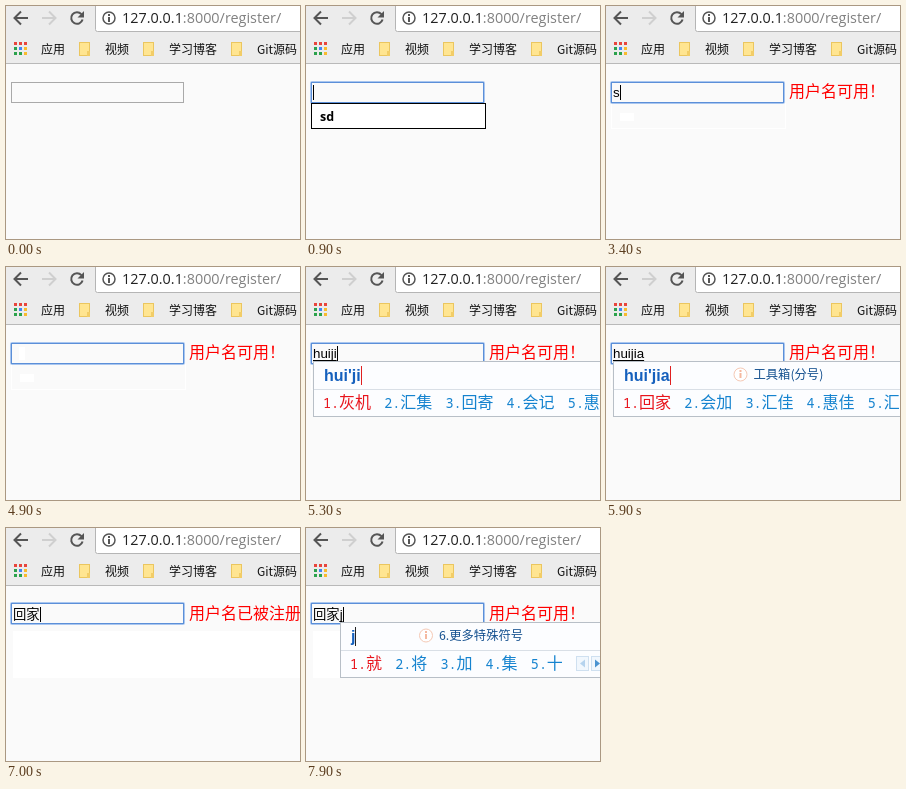
An HTML page for the animation above (8000 ms loop, 294 by 233 pixels).

```html
<!DOCTYPE html>
<html lang="zh">
<head>
<meta charset="utf-8">
<style>
html, body { margin: 0; width: 100%; height: 100%; overflow: hidden; background: #fafafa; }
svg { display: block; width: 294px; height: 233px; }
text { font-family: "Noto Sans CJK SC", "Noto Sans CJK", sans-serif; white-space: pre; }
.url { font: 14.4px "Open Sans", sans-serif; }
.mark { font-size: 12px; fill: #111; }
.field { font: 13.333px "Liberation Sans", "Noto Sans CJK SC", sans-serif; }
.pinyin { font: bold 16px "Liberation Sans", sans-serif; fill: #1560bd; }
.num { font: 13.5px "Noto Sans Mono", monospace; }
.word { font-size: 16px; }
.message { font: 16px "Noto Sans CJK TC", "Noto Sans CJK SC", sans-serif; }
.hint { font-size: 12.3px; fill: #14508f; }
.saved { font: bold 12.5px "Open Sans", sans-serif; }
</style>
</head>
<body>
<svg id="stage" viewBox="0 0 294 233"></svg>
<script>
const stage = document.getElementById('stage');

function add(parent, tag, attrs, text) {
  const node = document.createElementNS('http://www.w3.org/2000/svg', tag);
  for (const key in attrs) node.setAttribute(key, attrs[key]);
  if (text !== undefined) node.textContent = text;
  return parent.appendChild(node);
}
const box = (parent, x, y, width, height, fill, more) =>
  add(parent, 'rect', { x, y, width, height, fill, ...more });
const label = (parent, x, y, cls, text, fill) =>
  add(parent, 'text', fill ? { x, y, class: cls, fill } : { x, y, class: cls }, text);
const line = (parent, d, stroke, width) =>
  add(parent, 'path', { d, stroke, 'stroke-width': width, fill: 'none' });
const group = (parent = stage) => add(parent, 'g', {});
const show = (node, on) => node.setAttribute('display', on ? 'inline' : 'none');

function drawBrowser() {
  const g = group();
  box(g, 0, 0, 294, 233, '#fafafa');
  box(g, 0, 0, 294, 57, '#ececec');
  box(g, 0, 57, 294, 1, '#b9b9b9');
  box(g, 89.5, -5.5, 220, 31, '#fff', { stroke: '#b5b5b5', rx: 2 });

  line(g, 'M22 12H9M15 5.5L8.5 12L15 18.5', '#555', 2);
  line(g, 'M36 12H49M43 5.5L49.5 12L43 18.5', '#cfcfcf', 2);
  line(g, 'M75.4 8.2A5.8 5.8 0 1 0 76.6 13.6', '#555', 2);
  add(g, 'path', { d: 'M78 5V11.5H71.5Z', fill: '#555' });
  add(g, 'circle', { cx: 103, cy: 12, r: 6, fill: 'none', stroke: '#555', 'stroke-width': 1.5 });
  box(g, 102, 11, 2, 5, '#555');
  box(g, 102, 8, 2, 2, '#555');

  const url = label(g, 116, 17, 'url', '', '#222');
  add(url, 'tspan', {}, '127.0.0.1');
  add(url, 'tspan', { fill: '#808080' }, ':8000/register/');

  const red = '#e8453c', green = '#2ba24c', blue = '#4285f4', yellow = '#f9bb2d';
  [red, red, red, green, blue, yellow, green, green, yellow].forEach((c, i) =>
    box(g, 8 + i % 3 * 5, 36 + Math.floor(i / 3) * 5, 3, 3, c));

  label(g, 35, 48, 'mark', '应用');
  [[73, '视频'], [137, '学习博客'], [225, 'Git源码']].forEach(([x, name]) => {
    box(g, x + .5, 36.5, 10, 13, '#ffe591', { stroke: '#ebc65f' });
    box(g, x + 8, 45, 3, 5, '#f2cd68');
    label(g, x + 26, 48, 'mark', name);
  });
}
drawBrowser();

// Pale traces left behind by closed menus
const menuTrace = group();
box(menuTrace, 5.5, 97.5, 174, 25, 'none', { stroke: '#fff' });
box(menuTrace, 14, 107, 14, 8, '#fff');
const panelTrace = box(stage, 7, 103, 287, 47, '#fff');

const plainField = box(stage, 5.5, 76.5, 172, 20, '#fafafa', { stroke: '#a9a9a9' });
const focusField = group();
box(focusField, 4.5, 75.5, 174, 22, 'none', { stroke: '#a9c6ef', rx: 1 });
box(focusField, 5.5, 76.5, 172, 20, '#fafafa', { stroke: '#5b8fd8' });
const fieldTrace = box(stage, 13, 80, 6, 13, '#fff');
const typed = label(stage, 7, 91, 'field', '', '#000');
const underline = box(stage, 7, 93, 0, 1, '#000');
const caret = box(stage, 7, 79, 1, 15, '#000');
const message = label(stage, 183, 91, 'message', '', '#f00');

const menu = group();
box(menu, 5.5, 97.5, 174, 25, '#fff', { stroke: '#000' });
label(menu, 14, 115, 'saved', 'sd');

const panel = group();

function drawPanel({ left, code, words, hint, hintX, pager }) {
  panel.replaceChildren();
  box(panel, left + .5, 94.5, 300, 55, '#fcfdff', { stroke: '#b8bfc7' });
  box(panel, left + 1, 122, 300, 1, '#d9dfe6');
  const pinyin = label(panel, left + 11, 114, 'pinyin', code);
  const end = left + 11 + pinyin.getComputedTextLength();
  box(panel, Math.round(end), 99, 1, 19, code === 'j' ? '#222' : '#e02020');

  if (hint) {
    add(panel, 'circle', { cx: hintX, cy: 107.5, r: 6.5, fill: '#fff', stroke: '#f5c9b5' });
    box(panel, hintX - 1, 106, 2, 5, '#f5b9a0');
    box(panel, hintX - 1, 103, 2, 2, '#f5b9a0');
    label(panel, hintX + 13, 112, 'hint', hint);
  }

  const pitch = words[0].length * 16 + 29.2;
  [...words].forEach((word, i) => {
    const x = left + 10 + i * pitch;
    const fill = i ? '#1583cf' : '#e8141c';
    label(panel, x, 141, 'num', i + 1 + '.', fill);
    label(panel, x + 16, 141, 'word', word, fill);
  });

  if (pager) {
    box(panel, 270.5, 128.5, 12, 14, '#f1f7fd', { stroke: '#cfe0f0' });
    box(panel, 285.5, 128.5, 12, 14, '#f1f7fd', { stroke: '#cfe0f0' });
    add(panel, 'path', { d: 'M279 131.5V139.5L274 135.5Z', fill: '#b5d3ee' });
    add(panel, 'path', { d: 'M289 131.5V139.5L294 135.5Z', fill: '#4b93d0' });
  }
}

const free = '用户名可用！', taken = '用户名已被注册！';
const hu = { left: 7, code: 'hu', words: '湖户胡护虎', pager: true };
const hui = { left: 7, code: 'hui', words: '会回汇灰惠', pager: true };
const huiji = { left: 7, code: "hui'ji", words: ['灰机', '汇集', '回寄', '会记', '惠及'] };
const huijia = { left: 7, code: "hui'jia", words: ['回家', '会加', '汇佳', '惠佳', '汇家'] };
const ji = { left: 34, code: 'j', words: '就将加集十', pager: true };

// Each step changes only what it names; raw is the text still being composed
const steps = [
  [0, { text: '', raw: '', caret: false, focus: false, lift: 0, menu: false, panel: null,
        message: '', menuTrace: false, panelTrace: false }],
  [800, { focus: true, caret: true }],
  [900, { menu: true }],
  [1300, { caret: false }],
  [1800, { caret: true }],
  [2300, { caret: false }],
  [2500, { menu: false, menuTrace: true, text: 'sd', caret: true, message: free }],
  [3000, { caret: false }],
  [3400, { text: 's', caret: true }],
  [3500, { text: '' }],
  [3900, { caret: false }],
  [4400, { caret: true }],
  [4900, { caret: false }],
  [5000, { raw: 'hu', caret: true, panel: hu }],
  [5100, { raw: 'hui', panel: hui }],
  [5300, { raw: 'huiji', panel: huiji }],
  [5800, { raw: 'huijia', caret: false, panel: huijia }],
  [5900, { panel: { ...huijia, hint: '工具箱(分号)', hintX: 134.5 } }],
  [6000, { text: '回家', raw: '', caret: true, lift: -1, panel: null,
           menuTrace: false, panelTrace: true }],
  [6100, { message: taken }],
  [6500, { caret: false }],
  [7000, { caret: true }],
  [7500, { raw: 'j', panel: ji, message: free }],
  [7900, { panel: { ...ji, hint: '6.更多特殊符号', hintX: 120 } }]
];

let current = -1;

function render(time) {
  const index = steps.findLastIndex(([start]) => start <= time);
  if (index === current) return;
  current = index;
  const s = Object.assign({}, ...steps.slice(0, index + 1).map(step => step[1]));

  show(plainField, !s.focus);
  show(focusField, s.focus);
  focusField.setAttribute('transform', `translate(0 ${s.lift})`);
  show(menu, s.menu);
  show(menuTrace, s.menuTrace);
  show(fieldTrace, s.menuTrace && !s.text && !s.raw);
  show(panelTrace, s.panelTrace);
  message.textContent = s.message;

  typed.textContent = s.text;
  const start = s.text ? typed.getComputedTextLength() : 0;
  typed.textContent = s.text + s.raw;
  const end = typed.textContent ? typed.getComputedTextLength() : 0;
  underline.setAttribute('x', 7 + start);
  underline.setAttribute('width', end - start);
  caret.setAttribute('x', Math.round(7 + end));
  show(caret, s.caret);

  show(panel, s.panel);
  if (s.panel) drawPanel(s.panel);
}

function tick() {
  render(performance.now() % 8000);
  requestAnimationFrame(tick);
}
tick();
</script>
</body>
</html>
```
